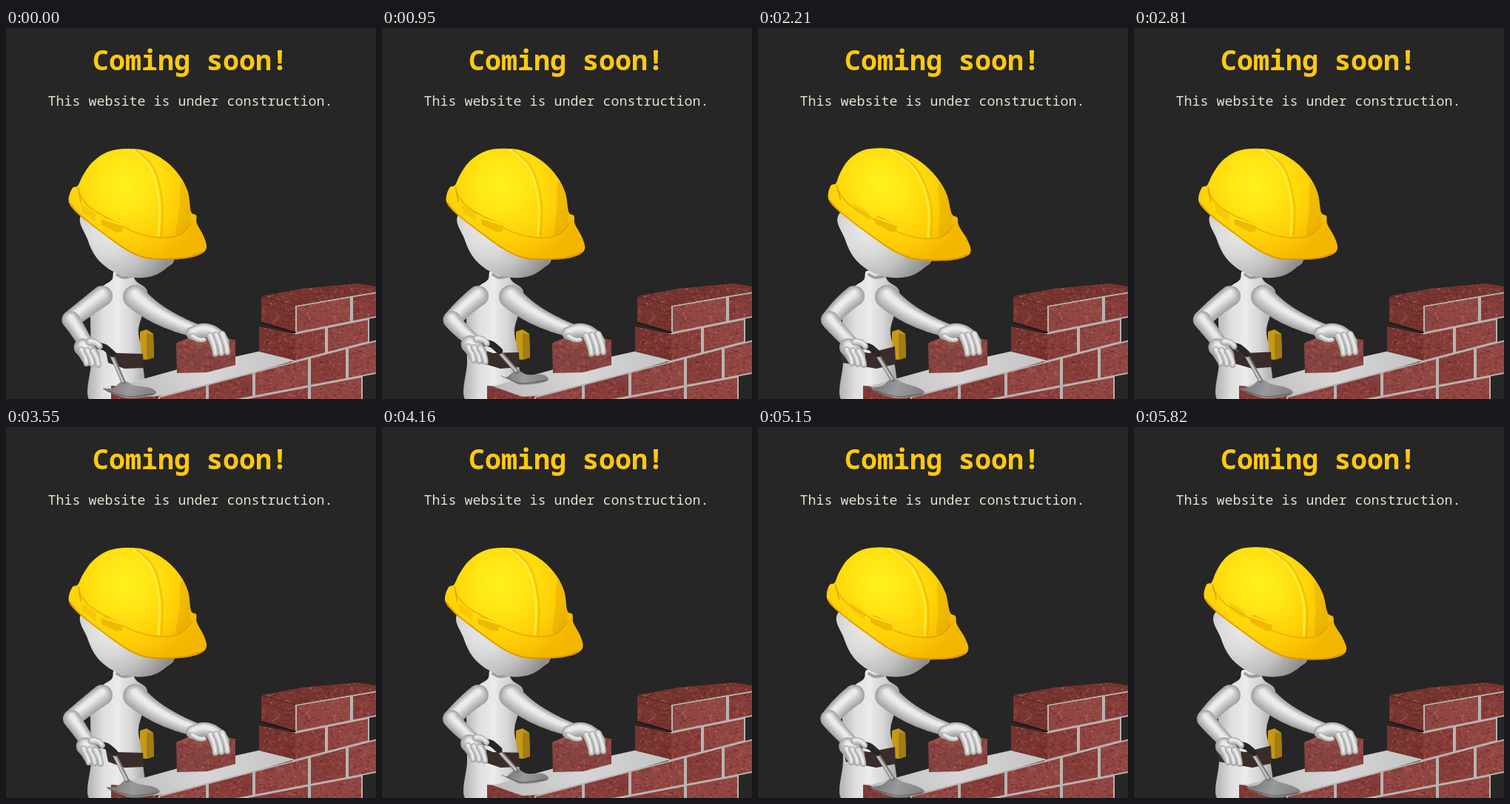
These frames come from a looping animation (500 by 501 pixels, 5890 ms). An HTML page with a canvas:

```html
<!DOCTYPE html>
<html lang="en">
<head>
<meta charset="utf-8">
<title>Coming soon</title>
<style>
html, body { margin: 0; width: 100%; height: 100%; overflow: hidden; background: #262626; }
canvas, svg { position: absolute; left: 0; top: 0; }
text { font-family: "Noto Sans Mono", "DejaVu Sans Mono", monospace; white-space: pre; }
</style>
</head>
<body>
<canvas id="c" width="500" height="501"></canvas>
<svg width="500" height="501">
<text x="117" y="57" font-size="36.67" font-weight="700" fill="#ffc90e">Coming soon!</text>
<text x="56.6" y="105" font-size="18.33" font-weight="500" fill="#e6dfcb">This website is under construction.</text>
</svg>
<script>
const W = 500, H = 501, LOOP = 5890, CYCLE = 3480, STEP = LOOP / 88;
const main = document.getElementById('c').getContext('2d');
let g = main;

const mix = (a, b, k) => a + (b - a) * k;
function ease(t, a, b) {
  const k = Math.max(0, Math.min(1, (t - a) / (b - a)));
  return k * k * (3 - 2 * k);
}

// Smooth curve through points given as a flat list.
function curve(p, closed) {
  const n = p.length / 2;
  const at = i => {
    i = closed ? (i + n) % n : Math.max(0, Math.min(n - 1, i));
    return [p[2 * i], p[2 * i + 1]];
  };
  g.beginPath();
  g.moveTo(p[0], p[1]);
  for (let i = 0; i < (closed ? n : n - 1); i++) {
    const a = at(i - 1), b = at(i), c = at(i + 1), d = at(i + 2);
    g.bezierCurveTo(b[0] + (c[0] - a[0]) / 6, b[1] + (c[1] - a[1]) / 6,
      c[0] - (d[0] - b[0]) / 6, c[1] - (d[1] - b[1]) / 6, c[0], c[1]);
  }
}
function blob(p, fill) { curve(p, true); g.fillStyle = fill; g.fill(); }
function line(p, color, width) {
  curve(p, false);
  g.strokeStyle = color; g.lineWidth = width;
  g.lineCap = g.lineJoin = 'round';
  g.stroke();
}
function poly(p, fill) {
  g.beginPath();
  for (let i = 0; i < p.length; i += 2) g.lineTo(p[i], p[i + 1]);
  g.closePath();
  g.fillStyle = fill; g.fill();
}
function shade(grad, colors) {
  colors.forEach((c, i) => grad.addColorStop(i / (colors.length - 1), c));
  return grad;
}
const linear = (x0, y0, x1, y1, ...c) => shade(g.createLinearGradient(x0, y0, x1, y1), c);
const radial = (x, y, r, ...c) => shade(g.createRadialGradient(x, y, 0, x, y, r), c);

// Rounded limb along a quadratic bend, lit from above.
function limb(x0, y0, cx, cy, x1, y1, r0, r1) {
  for (let layer = 0; layer < 6; layer++) {
    const v = 165 + layer * 14, size = 1 - layer * .15;
    g.fillStyle = `rgb(${v},${v},${v})`;
    g.beginPath();
    for (let i = 0; i <= 30; i++) {
      const k = i / 30, r = mix(r0, r1, k);
      const x = mix(mix(x0, cx, k), mix(cx, x1, k), k);
      const y = mix(mix(y0, cy, k), mix(cy, y1, k), k) - r * layer * .06;
      g.moveTo(x + r * size, y);
      g.arc(x, y, r * size, 0, 7);
    }
    g.fill();
  }
}

let seed = 7;
function rnd() { seed = (seed * 16807) % 2147483647; return seed / 2147483647; }

// A flat brick face with grain.
function brick(p, color) {
  g.save();
  poly(p, color);
  g.clip();
  const xs = p.filter((v, i) => i % 2 === 0), ys = p.filter((v, i) => i % 2);
  const x0 = Math.min(...xs), y0 = Math.min(...ys);
  const w = Math.max(...xs) - x0, h = Math.max(...ys) - y0;
  for (let i = 0; i < w * h / 16; i++) {
    g.fillStyle = rnd() < .5 ? 'rgba(75,22,20,.25)' : 'rgba(205,125,112,.25)';
    g.fillRect(x0 + rnd() * w, y0 + rnd() * h, 1 + rnd() * 3, 1 + rnd() * 2);
  }
  g.restore();
}

function layer(draw) {
  const c = document.createElement('canvas');
  c.width = W; c.height = H;
  g = c.getContext('2d');
  draw();
  g = main;
  return c;
}

// Each course: height at x = 390, slope, and the joints along it.
const courses = [
  { y: 375, slope: .17, joints: [391, 467, 503] },
  { y: 412, slope: .2, joints: [387, 433, 491] },
  { y: 450, slope: .26, joints: [206, 272, 335, 410, 461, 503] },
  { y: 487, slope: .19, joints: [300, 410, 482] },
  { y: 524, slope: .19, joints: [] }
];
const courseY = (k, x) => courses[k].y - courses[k].slope * (x - 390);

const wall = layer(() => {
  brick([142,483, 156,484, 232,493, 232,501, 142,501], '#803a36');
  poly([150,484, 185,474, 232,461, 345,436, 390,440, 390,449, 332,466, 232,495, 190,498],
    linear(160, 490, 380, 440, '#bdbdbd', '#d6d6d6', '#c4c4c4'));
  for (let k = 3; k >= 0; k--) {
    const { joints } = courses[k], last = joints[joints.length - 1];
    poly([joints[0],courseY(k, joints[0]), last,courseY(k, last),
      last,courseY(k + 1, last) + 1, joints[0],courseY(k + 1, joints[0]) + 1], '#b9b3b1');
    for (let i = 1; i < joints.length; i++) {
      const a = joints[i - 1] + 2, b = joints[i] - 2;
      brick([a,courseY(k, a) + 2, b,courseY(k, b) + 2, b,courseY(k + 1, b) - 1, a,courseY(k + 1, a) - 1],
        (i + k) % 2 ? '#904642' : '#863d39');
    }
    if (k < 2) {
      const x = 345 - 3 * k, y = 363 + 40 * k;
      brick([x,y, 391,375 + 38 * k, 391,410 + 39 * k, x,y + 34], '#783430');
    }
  }
  brick([345,362, 400,352, 475,345, 500,349, 500,356, 392,375], '#75352f');
  line([346,398, 370,405, 391,411], '#251717', 2);
});

const heldBrick = layer(() => {
  brick([230,426, 248,418, 310,421, 310,455, 272,465, 231,466], '#864340');
  brick([230,426, 250,417, 309,421, 273,431], '#914d48');
});

// One stroke: push forward, lift, lean in, then draw back.
function poseAt(t) {
  const ph = t % CYCLE;
  const push = (from, to) => ease(ph, from, to) + ease(ph + CYCLE, from, to) - 1;
  const reach = 1 - ease(ph, 2600, 3000) + push(3200, 3900);
  const lift = ease(ph, 150, 600) - ease(ph, 950, 1550);
  const lean = ease(ph, 500, 2050) - ease(ph, 2200, 3000);
  return { reach: ph < 3200 - CYCLE + 700 ? push(3200, 3900) + 1 : Math.min(1, reach + (ph < 3200 ? 1 : 0)), lift, lean };
}

// Forward share of the stroke, continuous over the cycle.
function reachAt(ph) {
  return ph < 2000 ? ease(ph + CYCLE, 3200, 3900) : 1 - ease(ph, 2600, 3000) + ease(ph, 3200, 3900);
}

function body(lean) {
  poly([181,410, 190,407, 199,413, 200,445, 190,448, 181,447], '#c49a16');
  poly([190,412, 199,414, 200,445, 190,447], '#a57b10');
  blob([147,328, 168,330, 176,342, 190,353, 190,370, 184,388, 179,410, 183,440, 183,505,
    115,505, 115,450, 114,392, 114,370, 128,351, 143,340],
    linear(110, 0, 192, 0, '#b0b0b0', '#dedede', '#ebebeb', '#d2d2d2', '#9c9c9c'));
  line([150,333, 158,337, 170,335], 'rgba(90,90,90,.5)', 4);
  const x = 134 - 24 * lean;
  poly([x,432, 150,439, 185,440 - 10 * lean, 186,459 - 5 * lean, 160,460, x + 4,452], '#3a2d29');
}

function head(lean) {
  g.save();
  g.translate(7.5 * lean, 0);
  blob([103,250, 110,285, 123,311, 145,329, 172,337, 198,335, 217,324, 228,308, 220,250, 165,220],
    radial(140, 272, 90, '#e8e8e8', '#dcdcdc', '#c0c0c0', '#8f8f8f'));
  g.restore();
}

function hat(lean) {
  g.save();
  g.transform(1, .04 * lean, .1 * lean, 1, -13 * lean, -7.2 * lean);
  blob([97,213, 104,199, 117,181, 138,167, 163,163, 190,166, 216,180, 235,200, 246,222, 250,248,
    257,253, 258,264, 267,281, 271,296, 264,305, 244,311, 212,313, 187,311,
    162,300, 135,281, 110,262, 95,249, 86,238, 85,228, 90,216],
    radial(160, 212, 112, '#fff21f', '#ffe414', '#ffd006', '#f4b600'));
  g.clip();
  blob([236,208, 246,222, 250,250, 246,270, 230,279, 234,245], 'rgba(204,148,0,.3)');
  line([98,222, 112,241, 140,258, 172,275, 206,283, 235,279, 252,262], 'rgba(215,150,0,.5)', 2);
  line([86,238, 95,249, 110,262, 135,281, 162,300, 187,311, 212,313, 244,311, 266,304], 'rgba(205,130,0,.6)', 4);
  const ridge = d => [172 + 4 * lean + d,165, 196 + 9 * lean + d,190, 207 + 12 * lean + d,235, 206 + 9 * lean + d,280];
  line(ridge(4), 'rgba(218,160,0,.35)', 3);
  line(ridge(0), 'rgba(255,241,70,.75)', 3);
  // strap clips
  const d = 16 * lean;
  poly([102 + d,238, 122 + d,251, 121 + d,262, 104 + d,250], 'rgba(225,163,0,.3)');
  poly([128 + d,257, 134 + d,255, 158 + d,265, 157 + d,275, 149 + d,276, 129 + d,266], '#f0b900');
  line([129 + d,257, 157 + d,266], '#ffe22c', 2);
  line([98,216, 101,235], '#dba000', 1.5);
  g.restore();
}

function fingers(x, y, dx, dy, length) {
  for (let i = 0; i < 3; i++) {
    const fx = x + i * dx, fy = y + i * dy;
    limb(fx, fy, fx + 6, fy + length / 2, fx + 7, fy + length, 5, 4);
  }
}

function rightHand() {
  limb(252, 412, 276, 400, 292, 424, 9, 10);
  fingers(276, 416, 8, -1, 24);
  limb(252, 416, 261, 423, 268, 421, 4, 3);
}

function leftArm(elbow, hx, hy) {
  limb(130, 362, 112, 375, elbow + 13, 393, 14, 12);
  limb(elbow + 12, 394, elbow + 20, 405, hx - 4, hy - 13, 12, 10);
}

function trowel(hx, hy, tx, ty, nx, ny, lift) {
  const lx = tx - 72 + 8 * lift, ly = ty - 6;
  blob([lx,ly, nx - 14,ny + 11, nx,ny + 1, nx + 14,ny + 7, tx - 8,ty - 7, tx,ty, tx - 14,ty + 5, tx - 38,ty + 7, lx + 16,ty + 2],
    linear(lx, ny, tx, ty + 8, '#6f6f6f', '#9a9a9a', '#7c7c7c'));
  line([lx + 6,ly + 3, tx - 36,ty + 5, tx - 4,ty + 1], 'rgba(70,70,70,.55)', 1.5);
  line([hx + 30,hy, nx,ny + 3], '#777', 6);
  line([hx + 29,hy, nx - 1,ny + 2], '#c2c2c2', 3);
  line([hx + 9,hy - 10, hx + 21,hy - 8, hx + 32,hy + 1], '#292626', 9);
}

function leftHand(hx, hy) {
  limb(hx - 8, hy - 8, hx - 3, hy - 4, hx + 2, hy + 4, 12, 13);
  fingers(hx - 10, hy - 4, 8, 1, 18);
  limb(hx + 1, hy - 15, hx + 10, hy - 16, hx + 15, hy - 9, 5, 4);
}

function render(t) {
  const ph = Math.floor(t / STEP) * STEP % CYCLE;
  const reach = reachAt(ph);
  const lift = ease(ph, 150, 600) - ease(ph, 950, 1550);
  const lean = ease(ph, 500, 2050) - ease(ph, 2200, 3000);
  const hx = 104 + 22 * reach + 4 * lean, hy = 439 - 4 * lift;
  g.fillStyle = '#262626';
  g.fillRect(0, 0, W, H);
  body(lean);
  leftArm(72 + 10 * reach + 3 * lean, hx, hy);
  head(lean);
  hat(lean);
  g.drawImage(wall, 0, 0);
  limb(174, 363, 206, 394, 264, 411, 16, 9);
  g.drawImage(heldBrick, 0, 0);
  rightHand();
  trowel(hx, hy, 191 + 34 * reach, 493 - 18 * lift, 146 + 36 * reach, 477 - 5 * reach - 11 * lift, lift);
  leftHand(hx, hy);
}

const begin = performance.now();
function tick() {
  render((performance.now() - begin) % LOOP);
  requestAnimationFrame(tick);
}
tick();
</script>
</body>
</html>
```
